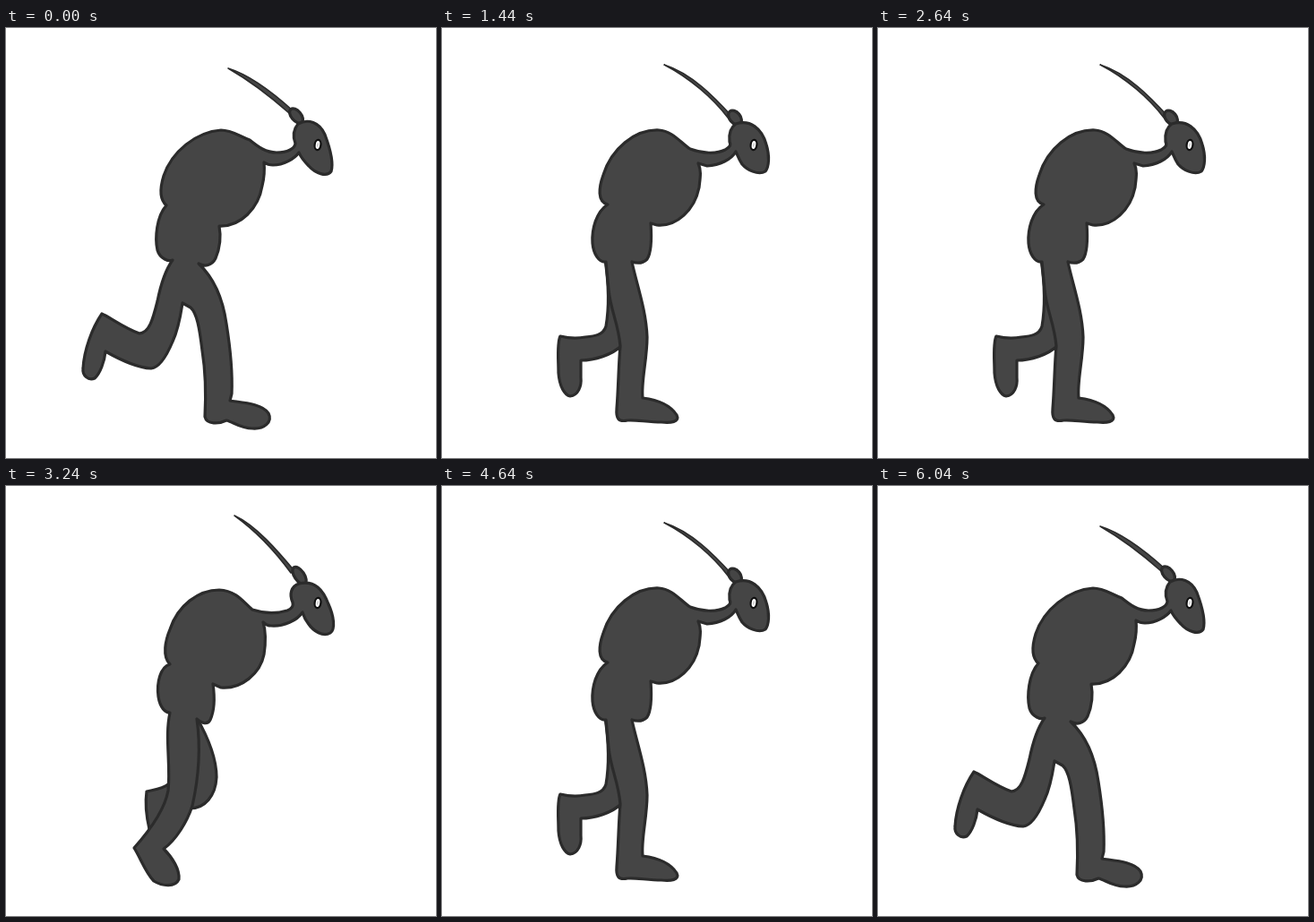
These frames come from a looping animation (480 by 480 pixels, 6.08 s). An HTML page:

```html
<!DOCTYPE html>
<html>
<head>
<meta charset="utf-8">
<style>
html, body { margin: 0; width: 100%; height: 100%; overflow: hidden; background: #fff; }
svg { display: block; width: 100vw; height: 100vh; }
path, .bulb { fill: #454545; stroke: #2b2b2b; stroke-width: 3.2; stroke-linejoin: round; }
.whip { stroke-width: 1.6; }
.eye { fill: #fff; stroke: #101010; stroke-width: 2.2; }
.pupil { stroke: #aaa; stroke-width: 1; }
</style>
</head>
<body>
<svg viewBox="0 0 480 480"></svg>
<script>
// Each pose: antenna, its root [x, y, rx, ry, angle], rear leg, torso, supporting leg(s)
const poses = [
  {
    whip: 'M248,45 C274,53 299,73 321,93 L316,95 C298,79 274,60 248,45Z',
    bulb: [324, 98, 9.5, 5.5, 50],
    rear: '',
    torso: `M179,198 C171,191 172,178 176,165 C185,138 212,116 240,114 C252,114 259,120 272,125
      C282,133 290,139 302,139 C314,139 322,135 323,129 C320,121 321,113 326,107
      C337,101 350,105 356,119 C362,135 366,150 363,160 C358,167 345,162 338,154
      C333,149 329,144 327,139 C322,146 310,153 298,153 C294,153 291,152 288,150
      C289,160 288,168 286,176 C282,201 262,222 238,221 C240,232 239,245 234,257 C230,265 222,267 215,263`,
    legs: `C231,278 242,302 246,330 C250,355 253,385 252,408 L250,416
      C262,418 286,419 293,430 C298,440 288,448 275,447 C262,447 252,439 246,438
      C238,442 224,443 222,434 C223,415 223,385 219,360 C216,335 213,318 206,312 L197,307
      C195,320 193,335 186,350 C181,362 172,379 162,380 C145,379 125,369 111,361
      C110,372 105,386 99,391 C92,394 85,388 86,380 C87,360 96,335 107,319
      C115,322 130,334 149,341 C160,340 164,325 169,305 C173,285 178,270 186,259
      C182,261 172,258 169,248 C166,235 168,210 179,198Z`
  },
  {
    whip: 'M248,41 C279,51 304,77 324,99 L319,100 C303,79 277,56 248,41Z',
    bulb: [327, 100, 9, 6, 50],
    rear: `M182,258 C186,285 187,310 183,333 C180,343 170,344 160,345 C150,347 140,346 132,344
      C128,352 130,370 130,385 C131,400 137,410 143,411 C152,410 156,400 155,390 L155,371
      C170,371 190,365 201,354 L205,300Z`,
    torso: `M185,197 C173,194 175,178 180,164 C189,135 215,113 242,114 C258,115 267,129 277,135
      C290,140 306,141 316,136 C321,133 323,131 321,127 C320,118 322,111 328,107
      C344,102 357,112 362,130 C366,143 365,155 361,160 C353,165 340,158 335,152
      C331,146 330,142 328,138 C323,147 310,153 296,154 L286,151
      C290,160 288,168 287,178 C282,203 262,222 240,220 L233,218 C234,232 234,250 229,258 C224,263 218,263 212,261`,
    legs: `C217,285 228,315 229,345 C229,370 222,395 224,413 C240,415 255,421 262,432
      C266,440 255,441 245,440 C230,440 215,437 207,438 C197,440 194,436 195,425
      C197,400 197,375 199,355 C197,330 188,315 186,292 L183,261
      C175,262 169,252 168,240 C167,225 172,205 185,197Z`
  },
  {
    whip: 'M255,33 C279,44 303,72 323,96 L318,97 C302,75 280,51 255,33Z',
    bulb: [327.5, 100, 11, 5.5, 56],
    rear: `M212,257 C227,283 235,305 235,325 C234,346 222,360 205,360 L160,383
      C157,370 155,355 157,341 C165,339 175,338 181,333Z`,
    torso: `M183,199 C174,190 178,172 183,160 C192,133 215,116 238,116 C258,117 266,131 275,138
      C290,143 304,142 314,139 C319,137 321,134 320,130 C316,121 318,112 327,109
      C345,105 354,116 360,132 C366,145 368,160 362,164 C354,169 343,162 337,153
      C333,148 332,144 331,141 C325,150 310,157 296,156 C292,156 289,154 287,152
      C290,162 290,175 288,188 C284,209 263,227 240,225 L231,221 C233,235 233,250 228,261 C225,267 219,265 213,260`,
    legs: `C218,295 214,330 208,357 C202,375 190,395 176,405 C186,415 194,428 193,439
      C189,448 175,447 165,441 C156,432 150,415 143,404 C160,385 177,362 181,340
      C184,310 177,280 183,253 C178,253 172,248 170,235 C168,220 172,202 183,199Z`
  },
  {
    whip: 'M260,26 C282,38 305,69 325,95 L320,97 C304,73 284,47 260,26Z',
    bulb: [328.5, 101, 11, 5.5, 58],
    rear: `M205,255 C235,270 262,298 264,322 C264,344 244,362 232,374 C236,384 240,398 234,406
      C226,410 216,400 210,390 C204,382 202,374 206,366 C216,354 228,340 226,328 L190,290Z`,
    torso: `M185,200 C176,191 180,174 184,162 C193,135 216,118 239,118 C259,119 267,133 276,139
      C291,144 305,144 315,141 C320,139 322,136 321,132 C317,123 319,114 328,110
      C346,106 355,117 361,133 C367,147 369,162 363,166 C355,171 344,164 338,155
      C334,150 333,146 332,143 C326,152 311,159 297,158 C293,158 290,156 288,154
      C291,164 291,177 289,190 C285,211 264,229 241,227 L232,223 C234,237 234,252 229,262 C226,268 220,266 213,262`,
    legs: `C216,292 210,322 201,348 C194,370 176,392 156,404 C162,414 168,428 167,441
      C164,450 150,451 140,443 C130,432 124,412 122,396 C146,380 164,358 172,336
      C178,312 176,282 184,254 C179,254 173,250 171,237 C169,222 174,204 185,200Z`
  }
];

const order = [0, 1, 2, 3, 2, 1];
const svg = document.querySelector('svg');

function drawPose({ whip, bulb: [x, y, rx, ry, angle], rear, torso, legs }) {
  return `<g><path class="whip" d="${whip}"/><path d="${rear}"/>
    <ellipse class="bulb" cx="${x}" cy="${y}" rx="${rx}" ry="${ry}" transform="rotate(${angle} ${x} ${y})"/>
    <path d="${torso}${legs}"/>
    <g transform="translate(348 130.5) rotate(8)">
      <ellipse class="eye" rx="3.4" ry="5.6"/><path class="pupil" d="M0,-2V2"/>
    </g></g>`;
}

svg.innerHTML = poses.map(drawPose).join('');
const groups = [...svg.children];

function frame(now) {
  const t = now % 6080;
  // the sixth step is held 40 ms longer
  const step = t < 1240 ? Math.min(5, Math.floor(t / 200)) : Math.floor((t - 40) / 200);
  const shown = order[step % 6];
  groups.forEach((g, i) => g.style.display = i === shown ? '' : 'none');
  requestAnimationFrame(frame);
}
frame(0);
</script>
</body>
</html>
```
